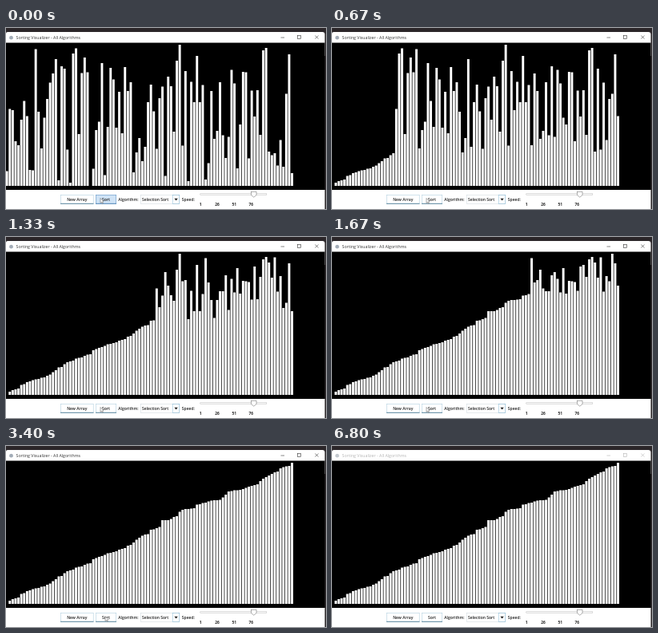
Write an HTML page with a canvas that moves like this. It is 400 px wide and 227 px high and loops after 8.07 s.

```html
<!DOCTYPE html>
<html lang="en">
<head>
<meta charset="utf-8">
<title>Sorting Visualizer</title>
<style>
html, body { margin: 0; width: 100%; height: 100%; overflow: hidden; background: #2b2629; }
canvas { display: block; width: 400px; height: 227px; }
</style>
</head>
<body>
<canvas id="stage"></canvas>
<script>
const W = 400, H = 227, LOOP = 8070, FRAME = 1000 / 15;
const BASE = 198, PITCH = 3.6, BAR = 2.9;
const canvas = document.getElementById('stage');
const ctx = canvas.getContext('2d');
const dpr = window.devicePixelRatio || 1;
canvas.width = W * dpr;
canvas.height = H * dpr;

// Top edge of each bar in the unsorted array
const shuffled = [
  179.5, 101.5, 103, 142, 147, 115, 91.5, 110.5, 178, 178.5,
  26.5, 105, 151, 112.5, 89, 68.5, 57, 39, 191, 48,
  51, 152.5, 194, 32, 25.5, 133, 56.5, 37, 55.5, 198,
  176.5, 128, 117.5, 44, 184.5, 124, 50, 64.5, 125, 80,
  132, 49, 79, 68, 181, 156, 138, 167, 149, 93,
  71, 104.5, 151.5, 88, 73.5, 185.5, 61, 73, 130, 41,
  21, 147.5, 54, 192, 67.5, 93, 35, 93, 71.5, 190,
  169.5, 79, 139, 129, 68, 134.5, 163, 136.5, 52.5, 69.5,
  176, 121, 55, 55.5, 163.5, 78.5, 111, 78, 134, 28,
  25, 155, 159.5, 157, 172.5, 140.5, 174, 82.5, 33, 182
];

// Selection sort, stopped after a number of passes
function sortedUpTo(passes) {
  const tops = shuffled.slice();
  for (let i = 0; i < passes; i++) {
    let low = i;
    for (let j = i + 1; j < tops.length; j++) if (tops[j] > tops[low]) low = j;
    [tops[i], tops[low]] = [tops[low], tops[i]];
  }
  return tops;
}

function passesAt(t) {
  if (t < 130) return 0;
  if (t < 199) return 1;
  if (t < 399) return 2;
  return Math.min(99, Math.floor((t - 190) / 21.6));
}

function rect(x, y, w, h, fill) {
  ctx.fillStyle = fill;
  ctx.fillRect(x, y, w, h);
}

function frame(x, y, w, h, color, width = 0.6) {
  ctx.strokeStyle = color;
  ctx.lineWidth = width;
  ctx.strokeRect(x, y, w, h);
}

function path(points, stroke, fill, width = 0.6) {
  ctx.beginPath();
  points.forEach(([x, y], i) => i ? ctx.lineTo(x, y) : ctx.moveTo(x, y));
  if (fill) {
    ctx.closePath();
    ctx.fillStyle = fill;
    ctx.fill();
  }
  if (stroke) {
    ctx.strokeStyle = stroke;
    ctx.lineWidth = width;
    ctx.stroke();
  }
}

function label(text, x, y, size = 5, color = '#222', weight = 600, align = 'left') {
  ctx.font = `${weight} ${size}px "Open Sans", "Noto Sans", sans-serif`;
  ctx.textAlign = align;
  ctx.fillStyle = color;
  ctx.fillText(text, x, y);
}

function drawTitleBar(active) {
  rect(0, 0, W, H, '#2b2629');
  ctx.fillStyle = '#fff';
  ctx.beginPath();
  ctx.roundRect(0, 5, 398.5, 30, [2, 3, 0, 0]);
  ctx.fill();
  const ink = active ? '#333' : '#b4b4b4';
  ctx.fillStyle = active ? '#a3adb8' : '#c3c9cf';
  ctx.beginPath();
  ctx.arc(6.5, 12.2, 2.4, 0, 7);
  ctx.fill();
  label('Sorting Visualizer - All Algorithms', 12.5, 14, 5.25, ink, 400);
  path([[343.5, 12], [348, 12]], ink);
  frame(364.5, 9.6, 4, 4, ink);
  path([[386.5, 9.5], [390.5, 13.5]], ink);
  path([[390.5, 9.5], [386.5, 13.5]], ink);
}

function drawBars(tops) {
  rect(0, 18.5, 398.5, 184.5, '#000');
  tops.forEach((top, i) => rect(i * PITCH - 0.3, top, BAR, BASE - top, '#fff'));
}

function button(text, x, w, state) {
  const pressed = state === 'pressed';
  rect(x, 209, w, 11.6, pressed ? '#cfe3f6' : state === 'hover' ? '#e6f1fb' : '#fff');
  frame(x + 0.3, 209.3, w - 0.6, 11, pressed ? '#6c9cc8' : '#b3d0e0');
  rect(x, 219.8, w, 0.9, pressed ? '#5689b9' : '#527f98');
  label(text, x + w / 2, 217, 5, '#222', 600, 'center');
}

function drawControls(sortState, newState) {
  rect(0, 203, 398.5, 24, '#fff');
  button('New Array', 68, 41.5, newState);
  button('Sort', 112, 26, sortState);
  label('Algorithm:', 140.3, 217);

  frame(168.3, 209.5, 48.5, 11, '#ccd6dc', 0.5);
  label('Selection Sort', 170, 217);
  frame(208.2, 209.5, 8.6, 11, '#8fbfd9');
  path([[210.4, 213.8], [214.8, 213.8], [212.6, 216.6]], null, '#222');

  label('Speed:', 219.8, 217);
  frame(242.8, 207.8, 83, 1.4, '#b5b5b5', 0.5);
  path([[306.5, 205.3], [313, 205.3], [313, 209.6], [309.75, 212.2], [306.5, 209.6], [306.5, 205]],
    '#777', '#fff');
  [1, 26, 51, 76].forEach((n, i) => label(String(n), 243 + i * 21.1, 223, 4.8, '#222', 700, 'center'));
}

function cursorAt(t) {
  if (t < 3399) return [118, 213.5];
  if (t < 4399) return [124, 213.5];
  if (t >= 5130) return null;
  const stops = [[112, 214], [101, 213], [104, 190], [121, 141], [142, 94], [151, 72.3]];
  return stops[Math.min(5, Math.floor((t - 4399) / FRAME))];
}

function drawCursor([x, y]) {
  const shape = [[0, 0], [0, 6], [1.4, 4.8], [2.4, 6.8], [3.3, 6.4], [2.4, 4.5], [4.1, 4.3], [0, 0]];
  path(shape.map(([dx, dy]) => [x + dx, y + dy]), '#555', '#fff', 0.5);
}

function draw(now) {
  const loopTime = now % LOOP;
  const t = Math.floor((loopTime + 4) / FRAME) * FRAME;
  ctx.setTransform(dpr, 0, 0, dpr, 0, 0);
  drawTitleBar(t < 6799);
  drawBars(sortedUpTo(passesAt(t)));
  const sortState = t < 130 ? 'pressed' : t < 199 ? 'hover' : 'idle';
  drawControls(sortState, t > 4460 && t < 4530 ? 'hover' : 'idle');
  const cursor = cursorAt(t + 4);
  if (cursor) drawCursor(cursor);
}

const start = performance.now();
function tick() {
  draw(performance.now() - start);
  requestAnimationFrame(tick);
}
tick();
</script>
</body>
</html>
```
